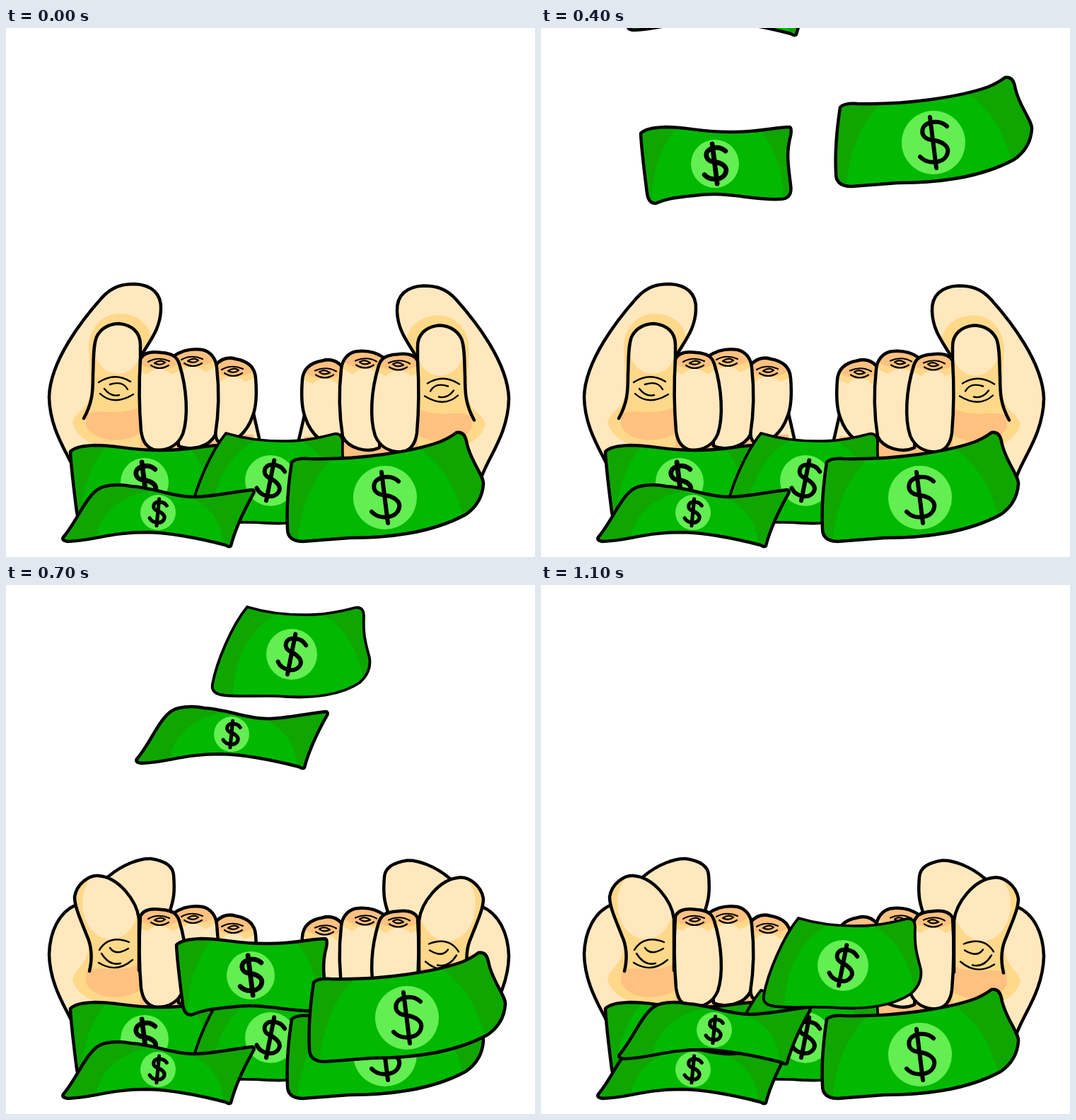
Recreate the animation shown at these times as an HTML page with a canvas. Size 748x748 px, loop 1200 ms.

```html
<!DOCTYPE html>
<html>
<head>
<meta charset="utf-8">
<title>Money grab</title>
<style>
html, body { margin: 0; width: 100%; height: 100%; overflow: hidden; background: #fff; }
canvas { display: block; width: 748px; height: 748px; }
</style>
</head>
<body>
<canvas id="stage" width="748" height="748"></canvas>
<script>
const ctx = document.getElementById('stage').getContext('2d');
const SKIN = '#ffe8be', TAN = '#ffd88a', ORANGE = '#ffc17f';
const GREEN = '#00b900', DARK = '#0fa600', LIGHT = '#63ee52';
const STEP = 100, STEPS = 12;

function fill(d, color) {
  ctx.fillStyle = color;
  ctx.fill(new Path2D(d));
}

function line(d, width = 4.5) {
  ctx.lineWidth = width;
  ctx.stroke(new Path2D(d));
}

function oval(x, y, rx, ry, color) {
  ctx.fillStyle = color;
  ctx.beginPath();
  ctx.ellipse(x, y, rx, ry, 0, 0, 7);
  ctx.fill();
}

// Filled outline whose shading is clipped to its inside
function shape(d, color, shade, width) {
  fill(d, color);
  ctx.save();
  ctx.clip(new Path2D(d));
  shade();
  ctx.restore();
  line(d, width);
}

// Bills are drawn around the centre of their light disc.
// glow: bright ellipse; sign: [scale, turn, line width]; keys: [step, x, y]
const bills = [
  {
    d: 'M-105-43Q-98-51-70-52C-40-52-20-45 20-45C60-44 85-52 106-52Q109-50 107-40C100-15 104 5 107 30Q110 50 92 50C50 52 20 38-30 45C-60 48-70 50-84 56Q-94 56-96 42C-100 10-104-20-105-43Z',
    glow: [4, 50, 93, 128], r: 34, sign: [.78, 0, 6.8], width: 4.5, rest: [196, 642],
    keys: [[1, 217, -40], [2, 227, 39], [4, 246, 192], [6, 246, 407], [7, 346, 552]]
  },
  {
    d: 'M-63-67C-30-57 0-55 30-56C55-57 75-62 90-66Q101-68 102-55C101-30 103-20 110 5Q113 25 96 40C70 58 30 62-5 60C-40 57-70 61-95 58Q-115 56-112 42C-106 10-85-40-63-67Z',
    glow: [10, 60, 93, 124], r: 36, sign: [.8, .32, 6], width: 3.8, rest: [374, 640],
    keys: [[5, 250, -95], [6, 298, -12], [7, 404, 98], [9, 361, 349], [11, 427, 538]]
  },
  {
    d: 'M-132-50Q-126-56-108-55C-36-53 39-65 78-79Q92-85 101-92Q112-94 115-80C119-54 140-31 139-19Q137 8 114 24C64 51 4 57-51 57Q-91 60-116 62Q-138 62-138 44C-140 6-136-24-132-50Z',
    glow: [-4, 75, 120, 160], r: 45, sign: [1, 0, 6], width: 4.5, rest: [536, 664],
    keys: [[1, 536, -20], [2, 536, 43], [3, 606, 102], [4, 555, 162], [6, 452, 488], [7, 567, 612]]
  },
  {
    d: 'M-75-37Q-58-41-38-37C-5-35 20-22 50-22C75-22 105-29 133-32Q138-31 134-25C120 0 108 28 103 47Q101 50 95 46C60 37 20 29-15 28C-70 28-90 40-127 41Q-137 40-134 35C-112 10-100-32-75-37Z',
    glow: [2, 44, 90, 75], r: 25, sign: [.52, .22, 5.2], width: 4.5, rest: [215, 685],
    keys: [[4, 258, -38], [6, 380, 110], [7, 319, 211], [9, 283, 452], [11, 245, 629]]
  }
];
const fallOrder = [0, 2, 1, 3];

function drawBill(bill, [x, y]) {
  const [scale, turn, pen] = bill.sign;
  ctx.save();
  ctx.translate(x, y);
  shape(bill.d, DARK, () => {
    oval(...bill.glow, GREEN);
    oval(0, 0, bill.r, bill.r, LIGHT);
  }, bill.width);
  ctx.rotate(turn);
  ctx.scale(scale, scale);
  line('M19-23Q9-32-5-28C-20-24-19-6-4-4C14-2 22 6 20 14C17 30-8 32-19 20M-5-36L4 36', pen / scale);
  ctx.restore();
}

// Position on the way down, or null when the bill is not in the air
function fallPos(keys, step) {
  const i = keys.findIndex(k => k[0] >= step);
  if (i < 0 || step < keys[0][0]) return null;
  const b = keys[i], a = keys[i - 1] || b;
  const p = a === b ? 0 : (step - a[0]) / (b[0] - a[0]);
  return [1, 2].map(n => a[n] + (b[n] - a[n]) * p);
}

const PALM_END = 'L350 545L358 580L350 640Z';
const poses = {
  open: {
    palm: 'M102 640C95 610 62 575 61 522C62 470 110 410 135 382C150 365 165 362 182 362C205 363 220 375 219 398C218 425 205 440 192 462' + PALM_END,
    shade: 'M94 558C98 540 119 540 120 510L117 450C118 425 135 404 160 404C185 404 203 418 206 440L192 470V594C150 598 104 592 94 558Z',
    thumb: 'M110 552C122 530 123 515 123 490C124 470 123 450 128 437C135 422 150 418 160 418C178 420 190 430 190 448V545',
    pad: [158, 452, 33, 37],
    folds: 'M131 501Q154 486 176 500M147 504Q165 498 172 511M139 510Q148 522 160 519M133 517Q152 535 180 518'
  },
  curled: {
    palm: 'M102 640C95 610 62 575 61 522C62 490 75 462 100 452L145 412C165 395 190 386 205 387C225 390 236 398 237 410C239 435 237 445 232 460' + PALM_END,
    shade: 'M94 558C98 540 115 538 117 510L190 490V594C150 598 104 592 94 558Z',
    thumb: 'M118 546C123 525 121 510 114 495C105 472 97 455 97 441C100 422 118 410 130 411C160 413 185 447 188 472V545',
    pad: [148, 450, 40, 51],
    folds: 'M132 516Q146 494 174 505M147 513Q155 525 173 514M135 521Q146 539 162 535M131 534Q156 550 179 530'
  }
};

// [outline, knuckle x, knuckle y], back to front
const fingers = [
  ['M297 476C305 467 315 465 325 468C342 471 352 480 353 495C355 520 354 535 349 548C340 575 320 588 306 588Q296 586 296 570Z', 321, 484],
  ['M237 464C250 455 265 453 278 455C290 458 297 468 298 480C302 515 300 550 296 575C288 592 262 599 244 591Z', 264, 470],
  ['M190 468C195 458 207 457 220 459C235 460 242 465 245 475C256 510 258 550 250 574C243 591 228 597 213 597C199 595 193 585 191 570C188 535 188 500 190 468Z', 217, 473]
];

function drawFinger([d, x, y]) {
  shape(d, SKIN, () => {
    oval(x, y - 4, 38, 23, TAN);
    oval(x, y + 37, 25, 28, SKIN);
    oval(x, y - 6, 32, 15, ORANGE);
  });
  ctx.save();
  ctx.translate(x, y);
  line('M-16-1Q-2-9 14-2M-7 1Q1-5 8 0Q2 5-7 1M-12 4Q0 12 13 4', 2.2);
  ctx.restore();
}

function drawHand(pose) {
  shape(pose.palm, SKIN, () => {
    fill(pose.shade, TAN);
    fill('M190 575H350V640H190Z', ORANGE);
  });
  fill(pose.thumb, TAN);
  ctx.save();
  ctx.clip(new Path2D(pose.thumb));
  oval(...pose.pad, SKIN);
  ctx.restore();
  fill('M114 546C130 537 160 550 188 536V574C165 588 124 586 113 562Z', ORANGE);
  line(pose.thumb);
  line(pose.folds, 2.4);
  fingers.forEach(drawFinger);
}

function draw(step) {
  const pose = step % 4 < 2 ? poses.open : poses.curled;
  ctx.fillStyle = '#fff';
  ctx.fillRect(0, 0, 748, 748);
  drawHand(pose);
  ctx.save();
  ctx.transform(-1, 0, 0, 1, 772, 2.5);
  drawHand(pose);
  ctx.restore();
  bills.forEach(b => drawBill(b, b.rest));
  for (const i of fallOrder) {
    const pos = fallPos(bills[i].keys, step);
    if (pos) drawBill(bills[i], pos);
  }
}

ctx.lineCap = ctx.lineJoin = 'round';
const start = performance.now();
function tick() {
  draw(Math.floor((performance.now() - start) / STEP) % STEPS);
  requestAnimationFrame(tick);
}
tick();
</script>
</body>
</html>
```
